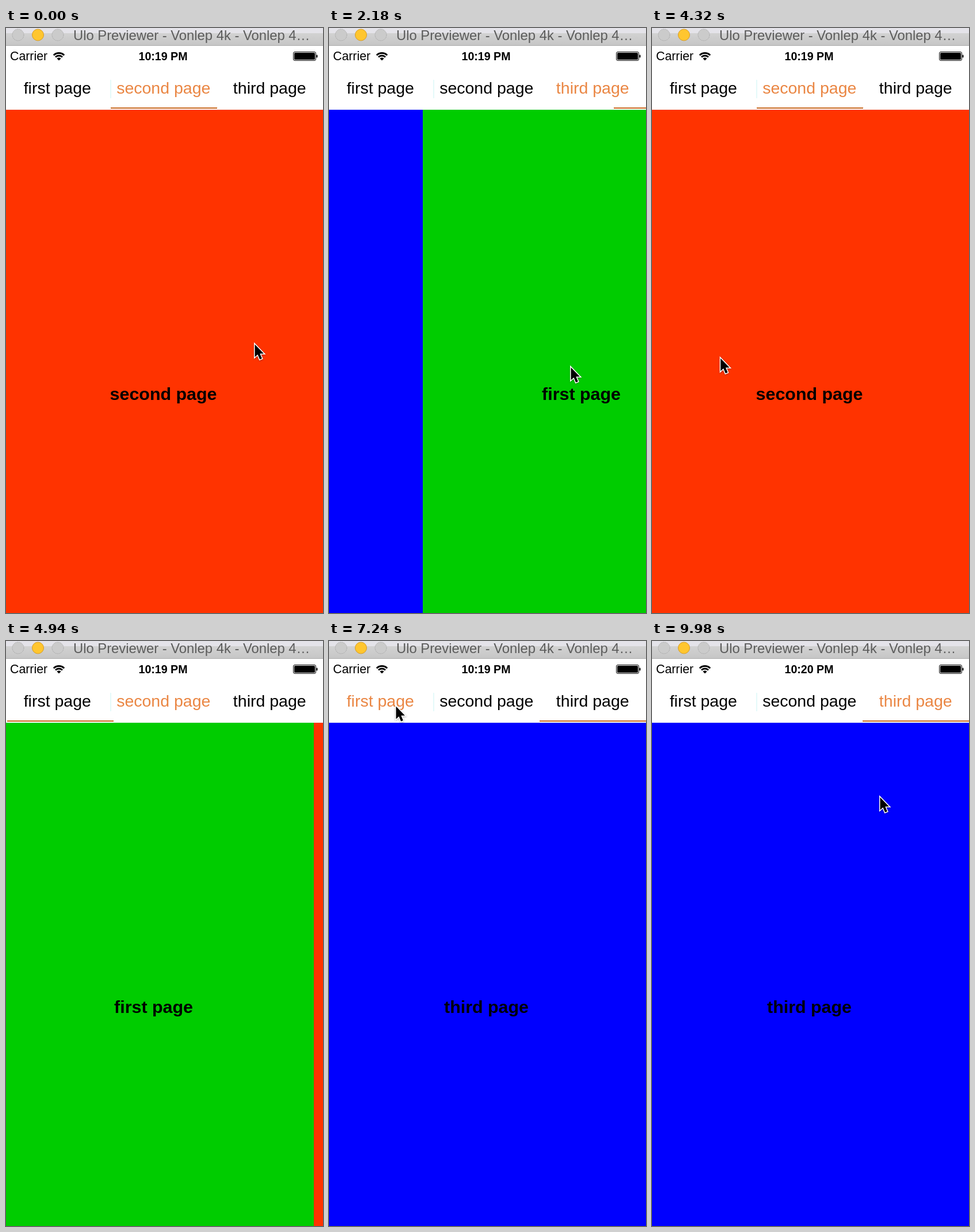
Write an HTML page with a canvas that moves like this. It is 551 px wide and 1016 px high and loops after 10000 ms.

```html
<!DOCTYPE html>
<html lang="en">
<head>
<meta charset="utf-8">
<title>Paged tabs</title>
<style>
html, body { margin: 0; width: 100%; height: 100%; overflow: hidden; background: #fff; }
canvas { display: block; }
</style>
</head>
<body>
<canvas id="stage" width="551" height="1016"></canvas>
<script>
const ctx = document.getElementById('stage').getContext('2d');
const LOOP = 10000, STEP = 20, W = 551, H = 1016;
const LEFT = -2.5, PAGE = 553.5, TAB = PAGE / 3, TOP = 142;
const SETTLED = 15.3 / PAGE;
const FONT = '"Liberation Sans", Arial, sans-serif';
const PAGES = [
  { name: 'first page', color: '#00cc00' },
  { name: 'second page', color: '#ff3300' },
  { name: 'third page', color: '#0000ff' }
];

const out = u => 1 - (1 - u) ** 3;
const inOut = u => u * u * (3 - 2 * u);
const mix = (a, b, u) => a + (b - a) * u;
const wrap = n => ((n % 3) + 3) % 3;

const swipe = (at, ms, by) => ({ at, ms, by, ease: out });
const tap = (at, by) => ({ at, ms: 300, by, ease: inOut, tap: true });
const MOVES = [
  swipe(500, 1000, 1),
  swipe(1700, 220, 0.4), swipe(2120, 290, 0.6),
  swipe(3180, 383, 1),
  swipe(4500, 635, -1),
  swipe(5640, 800, -1),
  tap(7240, -2), tap(8240, 1), tap(9260, 1)
];

// A tap selects its tab at once, a swipe when the page has settled.
function pagerAt(t) {
  let pos = 1, selected = 1;
  for (const m of MOVES) {
    if (t < m.at) break;
    const u = Math.min(1, (t - m.at) / m.ms), goal = pos + m.by;
    pos = mix(pos, goal, m.ease(u));
    const whole = Math.round(goal);
    if (m.tap || Math.abs(whole - pos) < SETTLED) selected = wrap(whole);
    if (u === 1) pos = wrap(goal);
  }
  return { pos, selected };
}

// Pointer stops: time, x, y
const STOPS = [
  [0, 431, 546], [700, 340, 560], [1200, 352, 557], [1700, 520, 575],
  [1920, 400, 590], [2180, 419, 586], [3180, 440, 585], [3340, -60, 575],
  [4500, 130, 570], [4720, 700, 575], [5640, 140, 560], [5860, 430, 560],
  [6780, 430, 540], [7200, 115, 110], [7700, 115, 110], [8020, 253, 104],
  [8600, 253, 104], [9200, 440, 106], [9500, 440, 106], [9980, 395, 268]
];

function pointerAt(t) {
  const i = STOPS.findLastIndex(s => s[0] <= t);
  const a = STOPS[i], b = STOPS[i + 1] || a;
  const u = inOut((t - a[0]) / (b[0] - a[0] || 1));
  return [mix(a[1], b[1], u), mix(a[2], b[2], u)];
}

function rect(x, y, w, h, color) {
  ctx.fillStyle = color;
  ctx.fillRect(x, y, w, h);
}

function text(str, x, y, font, color, align = 'center') {
  ctx.font = `${font} ${FONT}`;
  ctx.textAlign = align;
  ctx.fillStyle = color;
  ctx.fillText(str, x, y);
}

function windowButton(x, fill, edge, dash) {
  ctx.beginPath();
  ctx.arc(x, 12, 10, 0, Math.PI * 2);
  ctx.fillStyle = fill;
  ctx.fill();
  ctx.setLineDash(dash);
  ctx.strokeStyle = edge;
  ctx.lineWidth = 1;
  ctx.stroke();
  ctx.setLineDash([]);
}

function titleBar() {
  const g = ctx.createLinearGradient(0, 9, 0, 30);
  g.addColorStop(0, '#d2d2d2');
  g.addColorStop(1, '#c6c6c6');
  rect(0, 0, W, 30, g);
  rect(0, 0, W, 9, '#e4e3e9');
  rect(0, 30, W, 1, '#adadad');
  windowButton(21, '#cbcbcb', '#a9a9a9', [2, 1]);
  windowButton(55.5, '#ffc62f', '#d89b22', []);
  windowButton(90, '#cbcbcb', '#a9a9a9', [2, 1]);
  text('Ulo Previewer - Vonlep 4k - Vonlep 4…', 117, 21, '23.8px', '#5c5c5c', 'left');
}

function wifi(x, y) {
  const from = -Math.PI * 0.75, to = -Math.PI * 0.25;
  ctx.strokeStyle = ctx.fillStyle = '#000';
  ctx.lineWidth = 2.8;
  for (const r of [13, 8.5]) {
    ctx.beginPath();
    ctx.arc(x, y, r, from, to);
    ctx.stroke();
  }
  ctx.beginPath();
  ctx.moveTo(x, y);
  ctx.arc(x, y, 5, from, to);
  ctx.fill();
}

function battery() {
  ctx.strokeStyle = ctx.fillStyle = '#000';
  ctx.lineWidth = 1;
  ctx.beginPath();
  ctx.roundRect(499.5, 41.5, 39, 15, 2.5);
  ctx.stroke();
  ctx.beginPath();
  ctx.roundRect(501, 43, 36, 12, 1.5);
  ctx.roundRect(539.5, 46.5, 2, 5, 1);
  ctx.fill();
}

function statusBar(t) {
  text('Carrier', 7, 56, '21.3px', '#000', 'left');
  wifi(92, 56.5);
  text(t < 9000 ? '10:19 PM' : '10:20 PM', 273, 56, 'bold 19.6px', '#000');
  battery();
}

function tabs({ pos, selected }) {
  rect(181.5, 90, 1, 32, '#c9f6f6');
  PAGES.forEach((p, i) => {
    const color = i === selected ? '#ea8643' : '#000';
    text(p.name, LEFT + TAB * (i + 0.5) - 0.5, 114, '28.5px', color);
  });
  rect(0, 141, W, 1, '#f3f8fa');
  rect(Math.round(LEFT + pos * TAB - 0.5), 138, 185, 2, '#c9681f');
}

function pages(pos) {
  const base = Math.floor(pos);
  for (let n = base; n <= base + 1; n++) {
    const page = PAGES[wrap(n)], x = Math.round(LEFT + (n - pos) * PAGE);
    rect(x, TOP, PAGE + 1, H - TOP, page.color);
    text(page.name, x + 275.5, 646, 'bold 30.4px', '#000');
  }
}

function pointer(x, y) {
  const shape = [[0, 0], [0, 22], [5, 17.5], [8.6, 26], [12.4, 24.4], [8.8, 16], [15.5, 16]];
  ctx.save();
  ctx.translate(x + 1.5, y + 3.5);
  ctx.beginPath();
  shape.forEach(p => ctx.lineTo(...p));
  ctx.closePath();
  ctx.shadowColor = 'rgba(0,0,0,.3)';
  ctx.shadowBlur = 3;
  ctx.shadowOffsetY = 1;
  ctx.lineJoin = 'miter';
  ctx.lineWidth = 3;
  ctx.strokeStyle = '#fff';
  ctx.stroke();
  ctx.shadowColor = 'transparent';
  ctx.fillStyle = '#000';
  ctx.fill();
  ctx.restore();
}

function draw(t) {
  const pager = pagerAt(t);
  rect(0, 0, W, H, '#fff');
  titleBar();
  statusBar(t);
  tabs(pager);
  pages(pager.pos);
  pointer(...pointerAt(t));
}

const start = performance.now();
function frame() {
  const t = performance.now() - start;
  draw(Math.round(t / STEP) * STEP % LOOP);
  requestAnimationFrame(frame);
}
frame();
</script>
</body>
</html>
```
